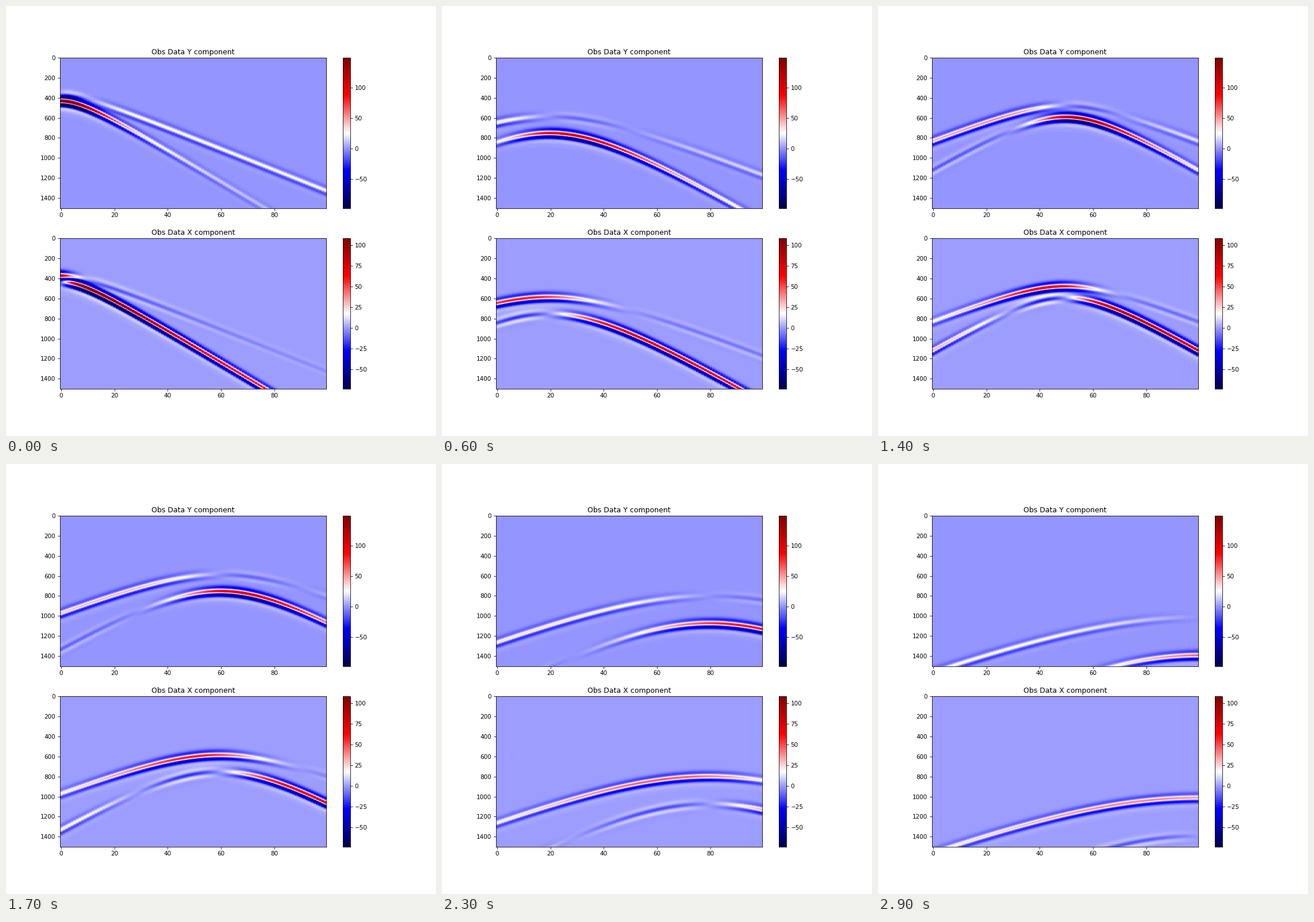
A matplotlib script that plays this animation: 748 px wide and 748 px high, repeating every 3 s.

```python
import numpy as np
import matplotlib.pyplot as plt
from matplotlib.animation import FuncAnimation

INCHES, DPI = 10, 74.8
FRAMES, INTERVAL = 30, 100

SAMPLES, RECEIVERS = 1500, 100
SLOW_P, SLOW_S = 10.65, 16.0      # time samples per receiver spacing
FREQ, DELAY = 0.0095, 262.5       # Ricker wavelet, in samples
GRID, SPACING, STRIDE = 11, 10, 4  # shots lie on a GRID x GRID lattice
LEFT, TOP = -0.5, 11              # position of the first lattice point
NFFT = 3072

time = np.arange(SAMPLES, dtype=float)
receivers = np.arange(RECEIVERS, dtype=float)


def wavelet_spectrum():
    q = (np.pi * FREQ * (time - DELAY)) ** 2
    ricker = (1 - 2 * q) * np.exp(-q)
    return np.fft.rfft(np.gradient(np.gradient(ricker)), NFFT)


WAVELET = wavelet_spectrum()


def arrival_terms(r, slowness):
    """Time-integrated pieces of the 2D line-force response."""
    tau = np.maximum(time / (r * slowness), 1)
    growth = slowness ** 2 * tau * np.sqrt(tau ** 2 - 1)
    return growth, slowness ** 2 * np.arccosh(tau)


def convolve(response):
    spectrum = np.fft.rfft(response, NFFT, axis=1) * WAVELET
    return np.fft.irfft(spectrum, NFFT, axis=1)[:, :SAMPLES].T


def record(column, row):
    """Particle velocity (Y, X) for an oblique force at one lattice point."""
    offset = receivers - (LEFT + SPACING * column)
    depth = TOP + SPACING * row
    r = np.hypot(offset, depth)[:, None]
    ny, nx = offset[:, None] / r, -depth / r
    p_growth, p_log = arrival_terms(r, SLOW_P)
    s_growth, s_log = arrival_terms(r, SLOW_S)
    radial = (p_growth - s_growth) * (nx + ny)
    direct = (p_log - p_growth + s_log + s_growth) / 2
    return [convolve(n * radial + direct) for n in (ny, nx)]


def shot(frame):
    return record(*divmod(frame * STRIDE, GRID))


first = shot(0)
GAIN = 200 / first[0].max()

fig = plt.figure(figsize=(INCHES, INCHES), dpi=DPI)


def panel(position, name, data, low, high):
    ax = fig.add_subplot(2, 1, position)
    image = ax.imshow(data * GAIN, cmap="seismic", aspect="auto",
                      vmin=low, vmax=high)
    ax.set_title(f"Obs Data {name} component")
    fig.colorbar(image, ax=ax)
    return image


images = [
    panel(1, "Y", first[0], -97.3, 148.6),
    panel(2, "X", first[1], -73.4, 108.4),
]


def update(frame):
    for image, data in zip(images, shot(frame)):
        image.set_data(data * GAIN)
    return images


anim = FuncAnimation(fig, update, frames=FRAMES, interval=INTERVAL,
                     repeat=True, repeat_delay=0, blit=False)
plt.show()
```
